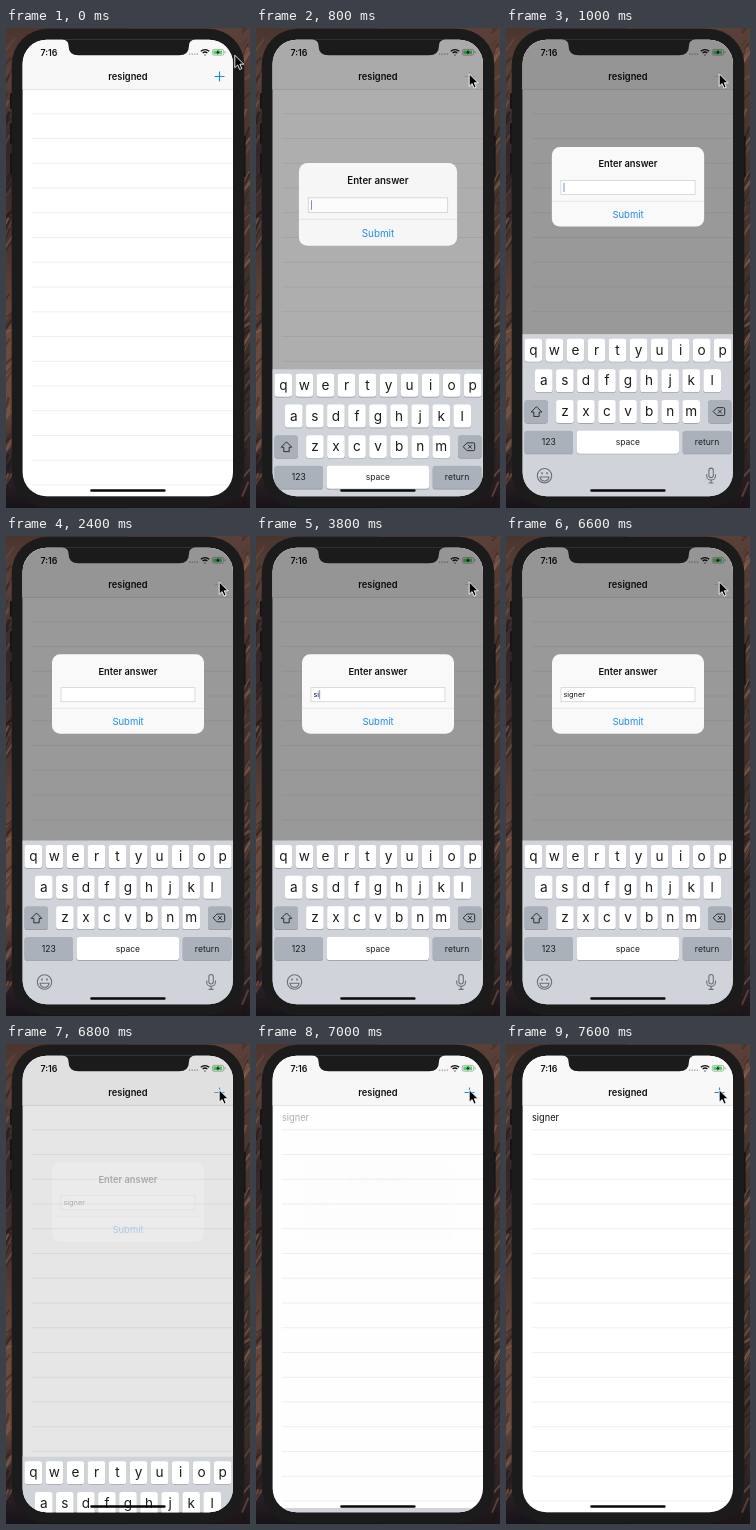
Recreate the animation shown at these times as an HTML page. Size 244 by 480 pixels, loop 8 s.

```html
<!DOCTYPE html>
<html lang="en">
<head>
<meta charset="utf-8">
<title>Answer list</title>
<style>
html, body { margin: 0; width: 100%; height: 100%; overflow: hidden; background: #2a2020; }
svg { display: block; width: 100%; height: 100%; }
text { font-family: Inter, "Liberation Sans", sans-serif; white-space: pre; }
.bold { font-weight: 600; font-size: 9.3px; fill: #111; }
.mid { text-anchor: middle; }
</style>
</head>
<body>
<svg viewBox="0 0 244 480" preserveAspectRatio="none">
  <defs>
    <linearGradient id="rockLeft" x2="0" y2="1">
      <stop offset="0" stop-color="#4a352f"/>
      <stop offset=".1" stop-color="#5c4238"/>
      <stop offset=".25" stop-color="#33262a"/>
      <stop offset=".45" stop-color="#4a342e"/>
      <stop offset=".65" stop-color="#6b4a3c"/>
      <stop offset=".78" stop-color="#6a4a3d"/>
      <stop offset=".88" stop-color="#3b2c2a"/>
      <stop offset="1" stop-color="#17131a"/>
    </linearGradient>
    <linearGradient id="rockRight" x2="0" y2="1">
      <stop offset="0" stop-color="#5a4038"/>
      <stop offset=".2" stop-color="#4a3730"/>
      <stop offset=".6" stop-color="#3f2f2b"/>
      <stop offset=".85" stop-color="#3a2b29"/>
      <stop offset="1" stop-color="#1b1519"/>
    </linearGradient>
    <clipPath id="screen"><rect x="16.6" y="11.7" width="210.4" height="456.6" rx="24"/></clipPath>
  </defs>

  <rect width="122" height="480" fill="url(#rockLeft)"/>
  <rect x="122" width="122" height="480" fill="url(#rockRight)"/>
  <g id="cracks" fill="none"/>
  <g fill="#171314">
    <rect x="4" y="65" width="3" height="16" rx="1"/>
    <rect x="4" y="95" width="3" height="21" rx="1"/>
    <rect x="4" y="125" width="3" height="21" rx="1"/>
    <rect x="237" y="108" width="2.6" height="41" rx="1"/>
  </g>
  <rect x="5.7" y=".8" width="232.6" height="478.4" rx="36" fill="#1b1b1c"/>

  <g clip-path="url(#screen)">
    <rect x="16" y="11" width="212" height="458" fill="#fff"/>
    <rect x="16" y="11" width="212" height="50" fill="#f8f8f8"/>
    <path d="M16 61.4H227" stroke="#cfcfcf" stroke-width=".6"/>
    <g id="lines" stroke="#dedee0" stroke-width=".5"/>
    <text id="row" x="26" y="77" font-size="9.2" fill="#111">signer</text>

    <text class="bold" x="34.5" y="27.5" style="font-size:8.8px">7:16</text>
    <text class="bold mid" x="122" y="52">resigned</text>
    <path id="plus" d="M208.5 48.5h10M213.5 43.5v10" stroke="#1688ea" stroke-width="1.1"/>
    <path d="M183 26.2h9" stroke="#999" stroke-width="1.2" stroke-dasharray="1.3 1.3"/>
    <g fill="none" stroke="#111" stroke-width="1.2">
      <path d="M194.8 23.3a6 6 0 0 1 8.4 0M196.6 25.2a3.4 3.4 0 0 1 4.8 0"/>
      <path d="M198.4 27h1.2"/>
      <rect x="206.3" y="21.4" width="11.4" height="5.8" rx="1.6" stroke="#999" stroke-width=".7"/>
      <path d="M219 23.3v2" stroke="#999" stroke-width=".9"/>
    </g>
    <rect x="207.3" y="22.4" width="8.8" height="3.8" rx=".7" fill="#4cd964"/>
    <path d="M212.6 21.6l-2.4 3.1h1.6l-.6 2.4 2.6-3.3h-1.7z" fill="#111"/>

    <rect id="dim" x="16" y="11" width="212" height="458"/>

    <g id="alert">
      <rect x="-76" y="-39.7" width="152" height="79.4" rx="8" fill="#f9f9f9"/>
      <text class="bold mid" y="-19.4">Enter answer</text>
      <rect x="-67" y="-6.3" width="134" height="14" fill="#fff" stroke="#cdcdcf" stroke-width=".7"/>
      <text id="typed" x="-64.5" y="3.3" font-size="7.3" fill="#111"></text>
      <rect id="caret" y="-4" width=".8" height="9.2" fill="#5a78d8"/>
      <path d="M-76 14.4H76" stroke="#dcdcde" stroke-width=".6"/>
      <text class="mid" y="31" font-size="9.5" fill="#1f8be6">Submit</text>
    </g>

    <g id="kb">
      <rect x="16" y="304.5" width="212" height="166" fill="#d0d4da"/>
      <g id="keys"/>
      <g fill="none" stroke="#222" stroke-width=".9" stroke-linejoin="round">
        <path d="M30.5 377l5.3 5.4h-2.6v4.4h-5.4v-4.4h-2.6z"/>
        <path d="M211 378h6.5q1.2 0 1.2 1.2v5.4q0 1.2-1.2 1.2H211l-3.8-3.9zM212 380l3.8 3.8M215.8 380l-3.8 3.8"/>
      </g>
      <g fill="none" stroke="#6b7078" stroke-width="1.1">
        <circle cx="38.5" cy="446" r="7.2"/>
        <path d="M34 447.3h9q-.7 4-4.5 4t-4.5-4z"/>
        <path d="M36 442.5v2M41 442.5v2" stroke-width="1.5"/>
        <rect x="202.9" y="438.5" width="4.4" height="9.5" rx="2.2"/>
        <path d="M200.7 444.5v1.5a4.4 4.4 0 0 0 8.8 0v-1.5M205.1 450.4v3M202.6 453.4h5"/>
      </g>
    </g>
    <rect x="84.2" y="461.2" width="75.4" height="2.5" rx="1.25" fill="#080808"/>
  </g>

  <path d="M56 11.2Q62.5 12 62.5 17.5Q62.5 27.3 72.5 27.3H173Q183 27.3 183 17.5Q183 12 189.5 11.2Z" fill="#1b1b1c"/>
  <path id="cursor" d="M0 0V12.5L2.9 9.8 4.9 14.3 7 13.4 5.1 9H9z" fill="#050505" stroke="#fff" stroke-width=".9" stroke-linejoin="round"/>
</svg>

<script>
const LOOP = 8000, STEP = 200, WORD = 'signer';
const OPEN = 600, TYPE = 3600, CLOSE = 6600;
const $ = id => document.getElementById(id);
const set = (node, attrs) => {
  for (const k in attrs) node.setAttribute(k, attrs[k]);
  return node;
};
const add = (parent, tag, attrs) =>
  parent.appendChild(set(document.createElementNS('http://www.w3.org/2000/svg', tag), attrs));
const clamp = x => Math.min(1, Math.max(0, x));
const easeOut = (x, power) => 1 - Math.pow(1 - clamp(x), power);

let seed = 7;
const random = () => (seed = seed * 16807 % 2147483647) / 2147483647;

// rough streaks on the rock either side of the phone
for (let i = 0; i < 110; i++) {
  const x = i % 2 ? 236 : -2, y = random() * 480;
  add($('cracks'), 'path', {
    d: `M${x} ${y}l${4 + random() * 8} ${-6 - random() * 12}`,
    stroke: random() < 0.6 ? '#1c1416' : '#a0715a',
    'stroke-width': 0.8 + random() * 2,
    opacity: 0.2 + random() * 0.35
  });
}

for (let i = 1; i <= 16; i++) {
  const y = 61 + 24.75 * i;
  add($('lines'), 'path', { d: `M26 ${y}H227` });
}

function addKey(x, y, w, label, size, fill = '#fff') {
  add($('keys'), 'rect', { x, y: y + 0.7, width: w, height: 23, rx: 2.8, fill: '#94979d' });
  add($('keys'), 'rect', { x, y, width: w, height: 23, rx: 2.8, fill });
  const baseline = y + (size > 10 ? 16 : 14.5);
  add($('keys'), 'text', { x: x + w / 2, y: baseline, class: 'mid', 'font-size': size, fill: '#1c1c1c' }).textContent = label;
}

[['qwertyuiop', 27.3, 309], ['asdfghjkl', 37.8, 339.7], ['zxcvbnm', 58.9, 370.3]].forEach(([letters, x, y]) =>
  [...letters].forEach((c, i) => addKey(x + 21.05 * i - 8.8, y, 17.6, c, 13.6)));
const GREY = '#abb1bb';
addKey(18.5, 370.3, 23.5, '', 9, GREY);
addKey(202, 370.3, 23.5, '', 9, GREY);
addKey(18.5, 401, 48.5, '123', 8.6, GREY);
addKey(70.7, 401, 102.3, 'space', 8.5);
addKey(176.7, 401, 48.8, 'return', 8.6, GREY);

function draw(time) {
  const t = Math.floor(time / STEP) * STEP;
  const shown = easeOut((t - OPEN) / 510, 3);
  const hidden = easeOut((t - CLOSE) / 480, 2);
  const left = 1 - hidden;

  // pointer moves onto the add button
  const m = easeOut(t / 500, 2);
  set($('cursor'), { transform: `translate(${228.8 - 15.6 * m} ${27.2 + 18.6 * m})` });
  set($('plus'), { opacity: 1 - 0.8 * clamp(shown * 1.2) * left });

  // dialog and keyboard
  set($('dim'), { opacity: 0.4 * clamp(shown * 1.03) * Math.pow(left, 1.3) });
  set($('alert'), {
    transform: `translate(122 ${158 + 82 * (1 - shown)}) scale(${1 + 0.18 * (1 - shown)})`,
    opacity: clamp(shown * 1.25) * Math.pow(left, 1.2)
  });
  set($('kb'), { transform: `translate(0 ${164 * (1 - shown + hidden)})` });

  // typing and caret
  const count = t < TYPE ? 0 : Math.min(WORD.length, (t - TYPE) / STEP + 1);
  $('typed').textContent = WORD.slice(0, count);
  const width = count ? $('typed').getComputedTextLength() : 0;
  const typing = count > 0 && count < WORD.length;
  const idle = t - (count ? TYPE + 1000 : 800);
  const lit = typing || (idle + 1000) % 1000 < 500;
  set($('caret'), { x: -64.3 + width, opacity: lit && t < CLOSE ? 1 : 0 });

  set($('row'), { opacity: clamp((t - 6900) / 300) });
}

const start = performance.now();
function tick() {
  draw((performance.now() - start) % LOOP);
  requestAnimationFrame(tick);
}
tick();
</script>
</body>
</html>
```
